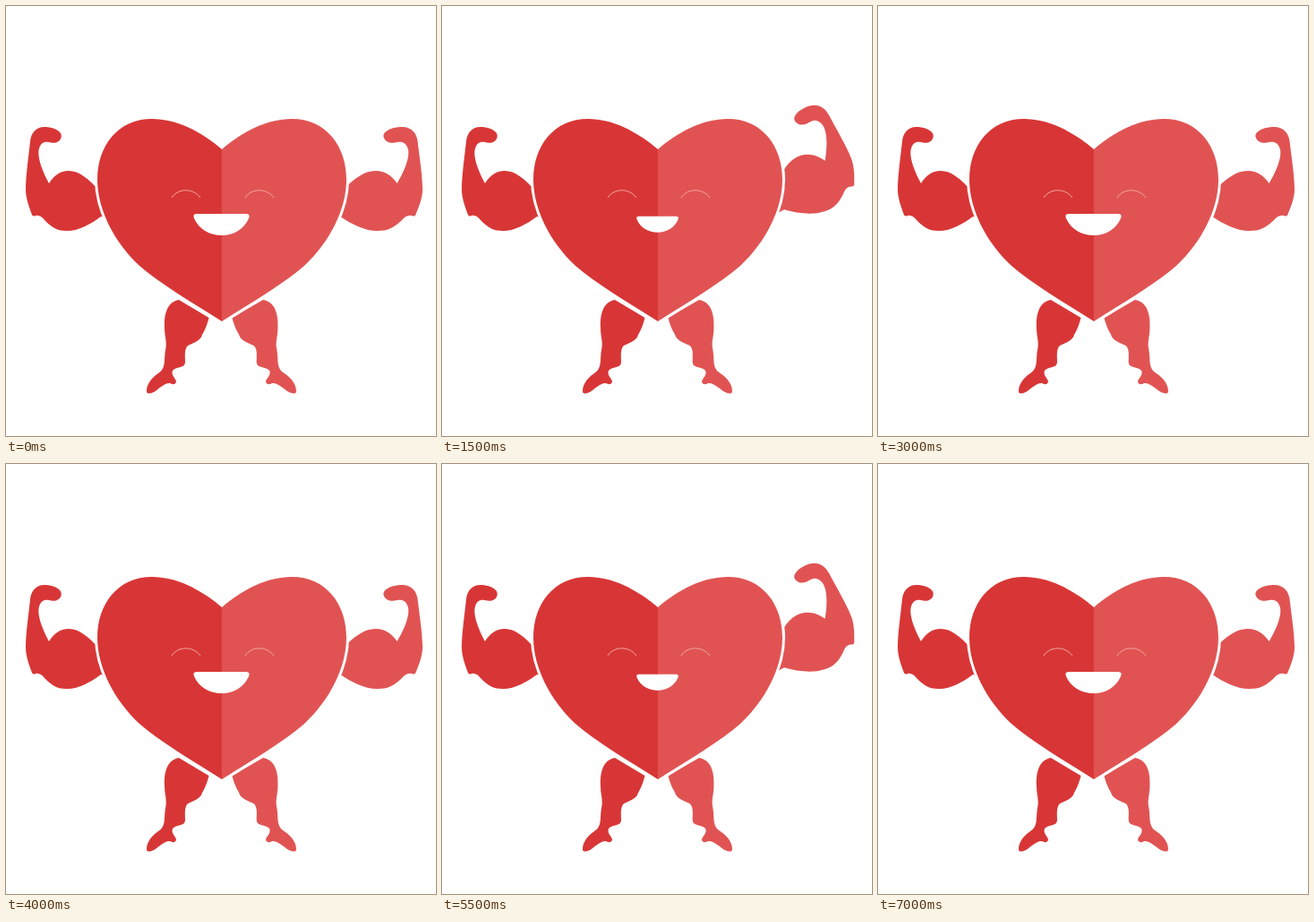
These frames come from a looping animation (480x480 px, 7500 ms). An HTML page:

```html
<!DOCTYPE html>
<html lang="en">
<head>
<meta charset="utf-8">
<title>Strong heart</title>
<style>
  html, body { margin: 0; width: 100%; height: 100%; overflow: hidden; background: #fff; }
  svg { display: block; width: 100vw; height: 100vh; }
</style>
</head>
<body>
<svg viewBox="0 0 480 480">
  <defs>
    <path id="arm" d="M104 206C92 193 82 184 70 184C60 184 53 190 48 198C42 187 34 169 37 159
      C39 153 42 151 48 152C54 154 60 152 61.5 147C64 140 53 135 43 135C33 135 28 142 27 151
      C25 170 22 190 22 205C22 214 26 225 29 233Q30 235.5 33 234C37 233 40 235 44 240
      C52 248 58 251 68 251C82 251 95 243 106 235L135 240L130 200Z"/>
    <path id="leg" d="M193 328C181 330 176 342 177 360C177 369 180 375 178 384C176 396 179 404 170 410
      C160 417 157 424 157 430C157 434 163 433 168 429C176 423 180 420 184 421.5C187 423 190 422 190 419
      C189 415 184 412 186 407C190 402 199 405 200 398C200 390 199 385 202 380
      C207 376 217 375 219 367C223 360 225 354 226.5 348Z"/>
    <path id="half" d="M241 160C218 140 190 126 163 126C125 126 102 156 102 194
      C102 226 120 263 149 290C172 310 206 330 241 352Z"/>
    <path id="eye" d="M185 214C192 203 209 203 217 214"/>
  </defs>
  <g fill="#d83636">
    <use id="left" href="#arm"/>
    <use href="#leg"/>
  </g>
  <g fill="#e15353">
    <g transform="matrix(-1.092 0 0 1 489 0)"><use id="right" href="#arm"/></g>
    <use href="#leg" transform="matrix(-1.03 0 0 1 485.7 0)"/>
  </g>
  <g fill="#fff" stroke="#fff" stroke-width="6">
    <use href="#half"/>
    <use href="#half" transform="matrix(-1 0 0 1 482 0)"/>
  </g>
  <use href="#half" fill="#d83636"/>
  <use href="#half" fill="#e15353" transform="matrix(-1 0 0 1 482 0)"/>
  <g fill="none" stroke="#f0a9a2">
    <use href="#eye"/>
    <use href="#eye" x="82"/>
  </g>
  <path id="mouth" fill="#fff" d="M213 232H268Q273 232 271 237C266 249 254 256 241 256
    C227 256 215 249 210 237Q208 232 213 232Z"/>
</svg>
<script>
  const LOOP = 7500, STEP = 500;
  const get = id => document.getElementById(id);
  const left = get('left'), right = get('right'), mouth = get('mouth');

  const raise = (arm, on, lift) =>
    arm.setAttribute('transform', on ? `translate(0 ${-lift}) rotate(20 104 212)` : '');

  // Rest, left flex, rest, right flex: each pose is held for one step.
  function draw(now) {
    const step = Math.floor(now % LOOP / STEP), pose = step % 4;
    raise(left, pose === 1, 4);
    raise(right, pose === 3, 7);
    mouth.setAttribute('transform', pose % 2 ? 'translate(240.5 243) scale(.75) translate(-240.5 -243)' : '');
    requestAnimationFrame(() => draw(performance.now()));
  }
  draw(performance.now());
</script>
</body>
</html>
```
